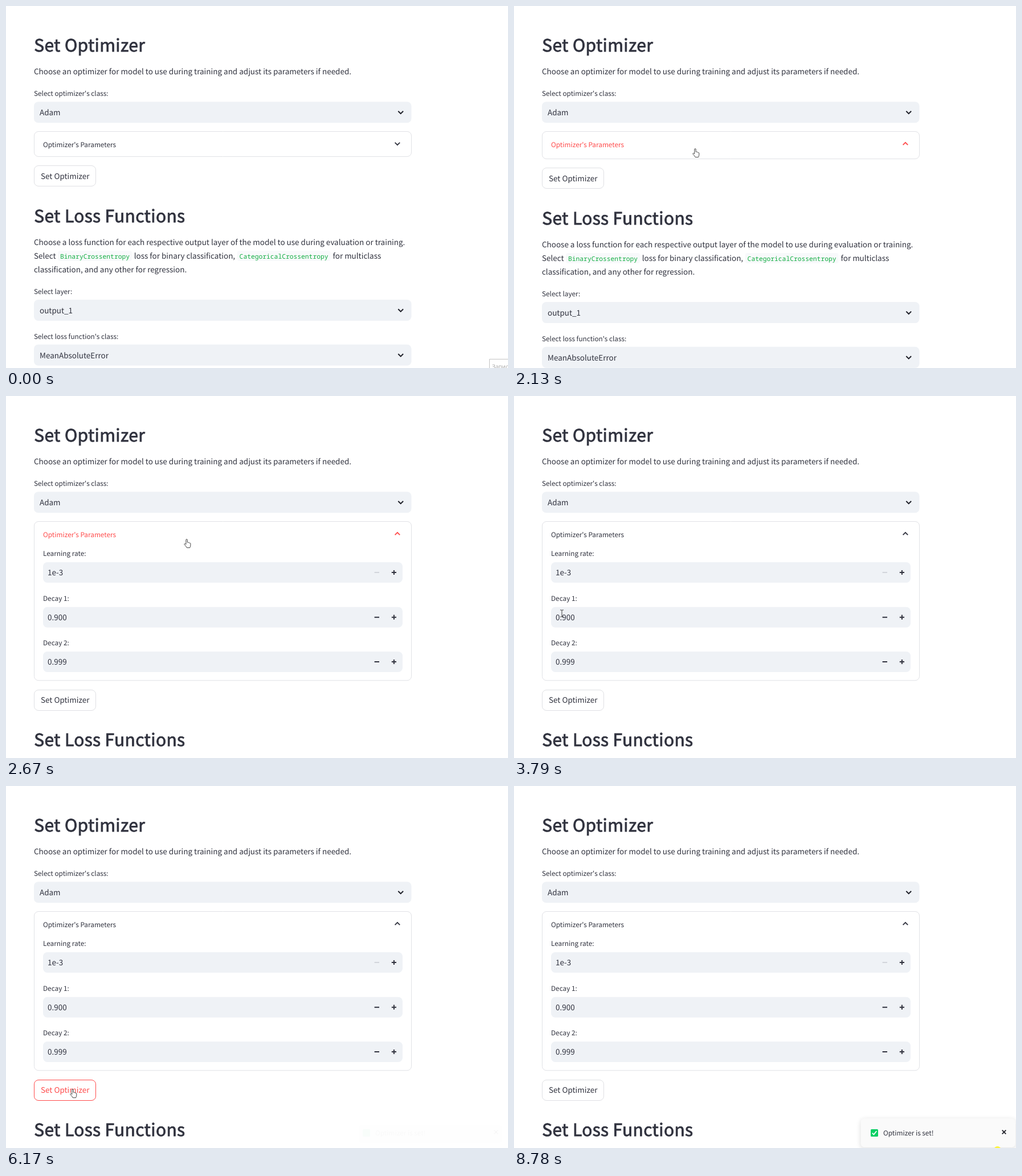
These frames come from a looping animation (881x636 px, 8840 ms). An HTML page with a canvas:

```html
<!DOCTYPE html>
<html lang="en">
<head>
<meta charset="utf-8">
<title>Optimizer settings</title>
<style>
  html, body { margin: 0; width: 100%; height: 100%; overflow: hidden; background: #fff; }
  canvas { display: block; width: 881px; height: 636px; }
</style>
</head>
<body>
<canvas id="stage"></canvas>
<script>
const W = 881, H = 636, LOOP = 8840, TICK = 10;
const INK = '#31333f', RED = '#ff4b4b', FIELD = '#eff2f6', LINE = '#e1e2e6';
const SANS = '"Noto Sans CJK JP", "Noto Sans CJK SC", "Noto Sans CJK", sans-serif';
const BODY = `13.48px ${SANS}`;
const SMALL = `11.8px ${SANS}`;
const TITLE = `30px ${SANS}`;
const CODE = '11.3px "Noto Sans Mono", "DejaVu Sans Mono", monospace';

const canvas = document.getElementById('stage');
const ctx = canvas.getContext('2d');
const dpr = window.devicePixelRatio || 1;
canvas.width = W * dpr;
canvas.height = H * dpr;

const LINK = new Path2D('M10 13a5 5 0 0 0 7.54.54l3-3a5 5 0 0 0-7.07-7.07l-1.72 1.71M14 11a5 5 0 0 0-7.54-.54l-3 3a5 5 0 0 0 7.07 7.07l1.71-1.71');
const ARROW = new Path2D('M0 0V11.4L2.6 9 4.4 13.1 6.2 12.3 4.4 8.3H8.2Z');
const HAND = new Path2D('M3.6 9.5V1.7a1.2 1.2 0 0 1 2.4 0V6q1.6-.7 2 .6 1.5-.5 1.9.7 1.7-.2 1.7 1.2V11q0 2-1.3 4.5H5Q4 13 1 10.2q-1-1.4.3-1.8 1 0 2.3 1.1z');
const BEAM = new Path2D('M-3-6H-1Q0-6 0-5 0-6 1-6H3M0-5V5M-3 6H-1Q0 6 0 5 0 6 1 6H3');

const clamp = v => Math.min(1, Math.max(0, v));
const ramp = (t, a, b) => clamp((t - a) / (b - a));
const smooth = p => p * p * (3 - 2 * p);
const easeOut = p => 1 - (1 - p) * (1 - p);

// y of a CSS cubic-bezier at progress p, solved by bisection
function bezier(p, x1, y1, x2, y2) {
  const at = (s, a, b) => 3 * s * (1 - s) * (1 - s) * a + 3 * s * s * (1 - s) * b + s * s * s;
  let lo = 0, hi = 1;
  for (let i = 0; i < 24; i++) {
    const mid = (lo + hi) / 2;
    if (at(mid, x1, x2) < p) lo = mid; else hi = mid;
  }
  return at(lo, y1, y2);
}

// pointer waypoints: time, x, y
const TRACK = [
  [580, 818, 585], [1380, 318, 251], [2130, 318, 251], [2800, 317, 252],
  [2870, 317, 252], [3720, 84, 382], [3790, 84, 382], [4620, 108, 497],
  [4680, 108, 497], [5160, 117, 533], [7030, 117, 533], [7910, 767, 591],
  [7980, 767, 592], [8380, 838, 642], [LOOP, 838, 642]
];

function pointerAt(t) {
  if (t < TRACK[0][0]) return null;
  const i = TRACK.findIndex(k => k[0] > t);
  const [t0, x0, y0] = TRACK[i - 1], [t1, x1, y1] = TRACK[i];
  const p = (i === 1 ? easeOut : smooth)(ramp(t, t0, t1));
  return { x: x0 + (x1 - x0) * p, y: y0 + (y1 - y0) * p };
}

const inside = (m, x, y, w, h) => !!m && m.x >= x && m.x < x + w && m.y >= y && m.y < y + h;

function text(str, x, y, font = BODY, color = INK) {
  ctx.font = font;
  ctx.fillStyle = color;
  ctx.fillText(str, x, y);
}

// regular weight thickened to semibold
function title(str, y) {
  ctx.save();
  ctx.letterSpacing = '0.37px';
  ctx.strokeStyle = INK;
  ctx.lineWidth = 0.85;
  ctx.lineJoin = 'miter';
  ctx.miterLimit = 3;
  text(str, 49.2, y, TITLE);
  ctx.strokeText(str, 49.2, y);
  ctx.restore();
}

function box(x, y, w, h, r, fill, stroke) {
  ctx.beginPath();
  ctx.roundRect(x, y, w, h, r);
  if (fill) { ctx.fillStyle = fill; ctx.fill(); }
  if (stroke) { ctx.strokeStyle = stroke; ctx.lineWidth = 1; ctx.stroke(); }
}

function lines(points, color, width) {
  ctx.beginPath();
  points.forEach(([x, y], i) => i ? ctx.lineTo(x, y) : ctx.moveTo(x, y));
  ctx.strokeStyle = color;
  ctx.lineWidth = width;
  ctx.stroke();
}

function chevron(x, y, size, dir, color, width) {
  const h = size / 2 * dir;
  lines([[x - size, y - h], [x, y + h], [x + size, y - h]], color, width);
}

function select(label, value, top) {
  text(label, 49, top - 10, SMALL);
  box(49, top, 662.5, 37, 7.5, FIELD);
  text(value, 59, top + 24);
  chevron(692.7, top + 18.7, 4.4, 1, '#1f2029', 2);
}

function stepper(label, value, top, canLower) {
  const y = top + 18;
  text(label, 65, top - 11, SMALL);
  box(65, top, 631, 36, 7.5, FIELD);
  text(value, 73, top + 23);
  lines([[646.6, y], [655, y]], canLower ? INK : '#d2d5db', 2);
  lines([[676.8, y], [685, y]], INK, 2);
  lines([[680.9, y - 4.1], [680.9, y + 4.1]], INK, 2);
}

function code(str, x, y) {
  box(x - 4, y - 14, str.length * 6.78 + 8, 18, 4, '#f8f9fb');
  text(str, x, y, CODE, '#12ae42');
}

function expander(t, grow, hot) {
  const h = 44 + grow, color = hot ? RED : INK;
  box(49.5, 220.5, 662, h, 7.5, '#fff', LINE);
  text("Optimizer's Parameters", 65, 248, SMALL, color);
  chevron(686.9, 242, 4.3, t >= 2100 ? -1 : 1, color, 1.8);
  if (grow <= 0) return;
  ctx.save();
  ctx.beginPath();
  ctx.rect(50, 264, 661, h - 44);
  ctx.clip();
  stepper('Learning rate:', '1e-3', 292, false);
  stepper('Decay 1:', '0.900', 370.7, true);
  stepper('Decay 2:', '0.999', 449, true);
  ctx.restore();
}

function button(top, hot, press) {
  const y = Math.round(top) + 0.5;
  box(49.5, y, 108, 36, 7.5, '#fff', hot ? RED : '#dfe0e4');
  if (press > 0) {
    ctx.save();
    ctx.globalAlpha = press;
    box(49.5, y, 108, 36, 7.5, RED, RED);
    ctx.restore();
  }
  text('Set Optimizer', 61, top + 23.7, BODY, press > 0.5 ? '#fff' : hot ? RED : INK);
}

function lossSection(dy, showLink) {
  ctx.save();
  ctx.translate(0, dy);
  title('Set Loss Functions', 379.8);
  if (showLink) {
    ctx.save();
    ctx.translate(22.6, 367);
    ctx.scale(0.77, 0.77);
    ctx.translate(-12, -12);
    ctx.strokeStyle = '#83858c';
    ctx.lineWidth = 1.8;
    ctx.lineCap = 'round';
    ctx.stroke(LINK);
    ctx.restore();
  }
  text('Choose a loss function for each respective output layer of the model to use during evaluation or training.', 49, 420);
  text('Select', 49, 444);
  code('BinaryCrossentropy', 95, 444);
  text('loss for binary classification,', 224.7, 444);
  code('CategoricalCrossentropy', 409.6, 444);
  text('for multiclass', 573.5, 444);
  text('classification, and any other for regression.', 49, 468);
  select('Select layer:', 'output_1', 516);
  select("Select loss function's class:", 'MeanAbsoluteError', 594.7);
  ctx.restore();
}

function toast(alpha) {
  if (alpha <= 0) return;
  ctx.save();
  ctx.globalAlpha = alpha;
  ctx.shadowColor = 'rgba(0,0,0,0.14)';
  ctx.shadowBlur = 9 * dpr;
  ctx.shadowOffsetY = 2 * dpr;
  box(608.5, 584, 271.5, 51, 7, '#fafafa');
  ctx.shadowColor = 'transparent';
  box(626, 603, 13, 13, 1.6, '#0bcf65');
  lines([[628.7, 609.6], [631.4, 612.4], [636.3, 606.2]], '#fff', 1.7);
  text('Optimizer is set!', 648, 614, SMALL);
  lines([[856.7, 604.7], [863.3, 611.3]], '#24252d', 1.8);
  lines([[863.3, 604.7], [856.7, 611.3]], '#24252d', 1.8);
  ctx.restore();
}

function hint(alpha) {
  if (alpha <= 0) return;
  ctx.save();
  ctx.globalAlpha = alpha;
  box(848.5, 620.5, 60, 30, 0, '#fff', '#c4c4c4');
  text('Запись', 853, 636.5, '10px "Open Sans", "Noto Sans", sans-serif', '#a4a4a4');
  ctx.restore();
}

function pointer(m, kind) {
  ctx.save();
  ctx.translate(m.x, m.y);
  ctx.fillStyle = '#fff';
  ctx.strokeStyle = '#3a3a3a';
  ctx.lineWidth = 0.95;
  if (kind === 'beam') {
    ctx.stroke(BEAM);
  } else {
    if (kind === 'hand') ctx.translate(-4.8, -0.8);
    const shape = kind === 'hand' ? HAND : ARROW;
    ctx.fill(shape);
    ctx.stroke(shape);
  }
  ctx.restore();
}

function draw(t) {
  ctx.setTransform(dpr, 0, 0, dpr, 0, 0);
  ctx.textRendering = 'geometricPrecision';
  ctx.fillStyle = '#fff';
  ctx.fillRect(0, 0, W, H);

  const grow = 235.3 * bezier(ramp(t, 2128, 2628), 0.23, 1, 0.32, 1) * (t > 2128);
  const m = pointerAt(t);
  const overHeader = inside(m, 49, 221, 662, 44);
  const overButton = inside(m, 49, 280 + grow, 109, 37);
  const overField = grow > 200 && [292, 370.7, 449].some(y => inside(m, 65, y, 570, 36));
  const focused = t >= 5770 && t < 8780;
  const press = t < 5770 ? 0 : 1 - ramp(t, 5900, 5970);

  title('Set Optimizer', 80);
  text('Choose an optimizer for model to use during training and adjust its parameters if needed.', 49, 120);
  select("Select optimizer's class:", 'Adam', 168.3);
  expander(t, grow, overHeader);
  button(280.2 + grow, overButton || focused, press);
  lossSection(grow, t >= 860 && t < 1170);
  toast(ramp(t, 6167, 6300));
  hint(t < 70 ? 1 : t < 120 ? 0.5 : 0);

  if (t >= 8780) {
    ctx.beginPath();
    ctx.arc(848.5, 639.5, 6.5, 0, 7);
    ctx.fillStyle = '#fdf33c';
    ctx.fill();
  }
  if (m) pointer(m, overHeader || overButton ? 'hand' : overField ? 'beam' : 'arrow');
}

function tick() {
  const t = performance.now() % LOOP;
  draw(Math.floor(t / TICK) * TICK);
  requestAnimationFrame(tick);
}
tick();
</script>
</body>
</html>
```
